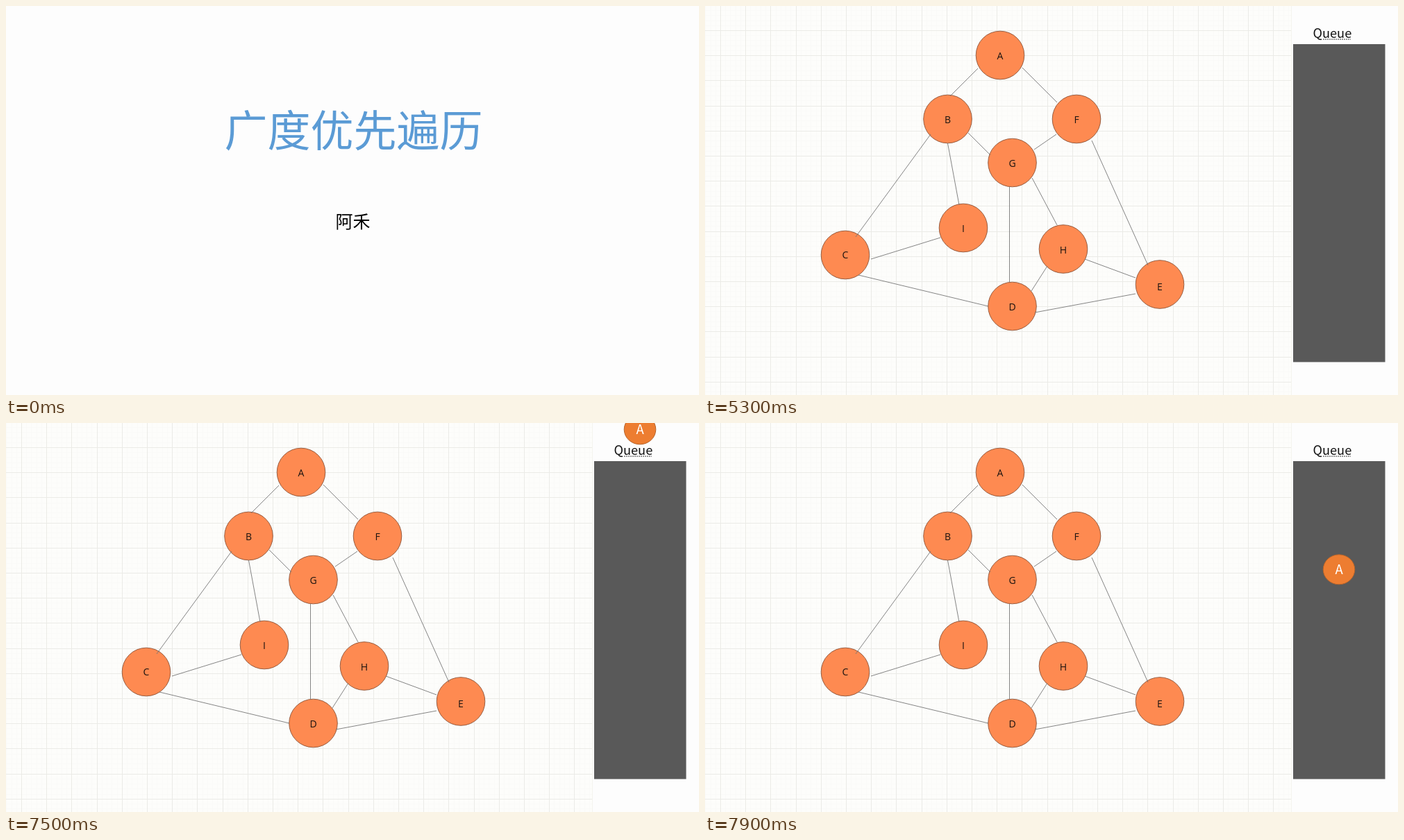
These frames come from a looping animation (998 px wide and 561 px high, 8000 ms). An HTML page:

```html
<!DOCTYPE html>
<html lang="zh">
<head>
<meta charset="utf-8">
<style>
  html, body { margin: 0; width: 100%; height: 100%; overflow: hidden; background: #fdfdfd; }
  svg { display: block; width: 100%; height: 100%; }
  text { text-anchor: middle; font-family: "Noto Sans CJK SC", "Noto Sans CJK", sans-serif; }
  .title { font-size: 62px; font-weight: 300; fill: #5b9bd5; }
  .author { font-size: 25px; font-weight: 300; }
  .label { font-size: 18.2px; font-weight: 300; fill: #111; text-anchor: start; }
  .node circle { fill: #fe8a51; stroke: #8c5236; stroke-width: .9; }
  .node text { font: 14px "Open Sans", "Noto Sans", sans-serif; fill: #1a1310; }
  #edges { stroke: #777; stroke-width: .9; fill: none; }
  #ball ellipse { fill: #ed7d31; stroke: #b5632a; }
  #ball text { font-size: 18.5px; font-weight: 300; fill: #fff; }
</style>
</head>
<body>
<svg viewBox="0 0 998 561" preserveAspectRatio="none">
  <g id="intro">
    <text class="title" x="500.5" y="203">广度优先遍历</text>
    <text class="author" x="499.5" y="320">阿禾</text>
  </g>
  <g id="graph">
    <rect width="844" height="561" fill="#fdfdfb"/>
    <path id="minor" stroke="#fafaf8"/>
    <path id="major" stroke="#ebebe7"/>
    <path d="M844.5 0V561" stroke="#f4f4ee"/>
    <g id="nodes"></g>
    <path id="edges"/>
    <text class="label" x="875.5" y="46">Queue</text>
    <path d="M890 48H930" stroke="#333" stroke-dasharray="2 1"/>
    <rect x="847" y="55" width="132.500" height="458.500" fill="#595959"/>
    <g id="ball">
      <ellipse rx="22.800" ry="21.500"/>
      <text y="6.700">A</text>
    </g>
  </g>
</svg>
<script>
const $ = id => document.getElementById(id);

// Square paper: heavier lines every fifth cell
const CELL = 36.2;
function grid(step) {
  let d = '';
  for (let x = 22 - 3 * CELL; x < 844; x += step) if (x > 0) d += `M${Math.round(x) + .5} 0V561`;
  for (let y = 35 - 3 * CELL; y < 561; y += step) if (y > 0) d += `M0 ${Math.round(y) + .5}H844`;
  return d;
}
$('minor').setAttribute('d', grid(CELL / 5));
$('major').setAttribute('d', grid(CELL));

// Name, centre, text baseline
const nodes = [
  ['A', 425, 71, 77], ['B', 349.5, 163, 168.5], ['C', 202, 359, 364],
  ['D', 442.5, 433, 438.5], ['E', 655, 401.5, 409.5], ['F', 535, 163, 168.5],
  ['G', 442.5, 226, 231.5], ['H', 516, 350.5, 356.5], ['I', 372, 320, 326]
];
$('nodes').innerHTML = nodes.map(([name, x, y, base]) =>
  `<g class="node"><circle cx="${x}" cy="${y}" r="34.8"/><text x="${x}" y="${base}">${name}</text></g>`
).join('');

const edges = [
  [393, 90, 353, 130], [457, 89, 507, 139], [325, 185, 217, 333],
  [349.5, 198, 366, 287], [379, 183, 411, 215], [506, 185, 474, 207],
  [557, 194, 638, 374], [438.5, 261, 438.5, 398], [471, 248, 507, 316],
  [239, 365, 339, 334], [221, 388, 408, 433], [493, 375, 470, 411],
  [547, 365, 620, 392], [475, 442, 620, 415]
];
$('edges').setAttribute('d', edges.map(([x, y, u, v]) => `M${x} ${y}L${u} ${v}`).join(''));

const show = (id, on) => $(id).setAttribute('visibility', on ? 'visible' : 'hidden');

function draw(now) {
  const t = Math.floor(now % 8000 / 100) * 100;
  const started = t >= 5100;
  show('intro', !started);
  show('graph', started);
  show('ball', t >= 7500);
  $('ball').setAttribute('transform', `translate(913 ${110.3 + (t - 7700) * .505})`);
}

const start = performance.now();
function frame() {
  draw(performance.now() - start);
  requestAnimationFrame(frame);
}
frame();
</script>
</body>
</html>
```
